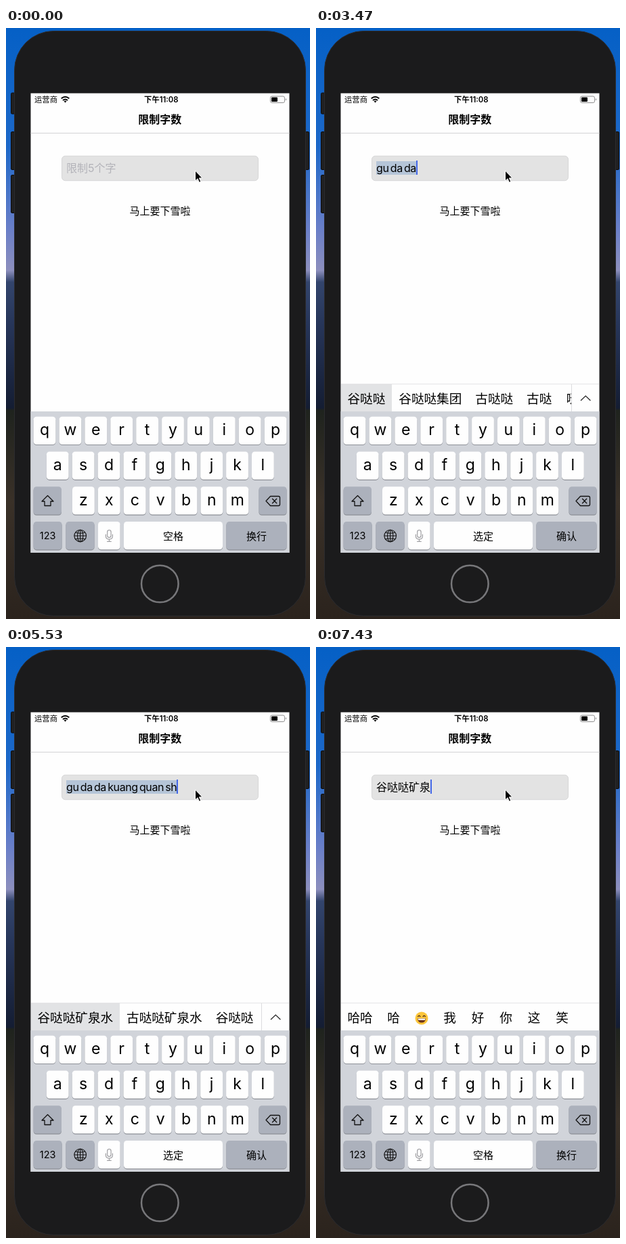
An HTML page for the animation above (8 s loop, 449x874 px).

```html
<!DOCTYPE html>
<html lang="zh-CN">
<head>
<meta charset="utf-8">
<style>
  html, body { margin: 0; width: 100%; height: 100%; overflow: hidden; }
  svg, #field, #bar { position: absolute; }
  #stage { left: 0; top: 0; }
  text { font-family: Inter, 'Noto Sans CJK SC', sans-serif; text-anchor: middle; }
  #field {
    left: 89px; top: 189px; height: 36px; line-height: 36px; white-space: pre;
    font-size: 16px; font-family: Inter, 'Noto Sans CJK SC', sans-serif;
  }
  #typed.marked { background: #b5c5d8; letter-spacing: -.4px; }
  #caret { position: absolute; left: 100%; top: 7px; width: 2px; height: 21px; background: #4468e8; }
  #hint { position: absolute; left: 0; top: 0; color: #b3b3b9; }
  #bar {
    left: 36.5px; top: 526px; width: 381.5px; height: 41px; box-sizing: border-box;
    border-top: 1px solid #e4e4e6;
  }
  #list { display: flex; height: 40px; overflow: hidden; }
  #list span {
    flex: none; box-sizing: border-box; min-width: 41.5px; padding: 0 10px; text-align: center;
    white-space: nowrap; font: 18.6px/39px 'Noto Sans CJK SC', sans-serif;
  }
  #list span.on { background: #e2e3e5; }
  #list svg { position: static; vertical-align: -4px; margin: 0 -1px; }
  #more { left: 340.5px; top: 0; }
</style>
</head>
<body>
<svg id="stage" width="449" height="874">
  <defs>
    <linearGradient id="scene" x2="0" y2="1">
      <stop offset="0" stop-color="#0560c6"/><stop offset=".2" stop-color="#1d68c8"/>
      <stop offset=".34" stop-color="#6a7fc8"/><stop offset=".41" stop-color="#8d8fbd"/>
      <stop offset=".43" stop-color="#33456d"/><stop offset=".5" stop-color="#27365a"/>
      <stop offset=".643" stop-color="#141d33"/><stop offset=".647" stop-color="#1f231e"/>
      <stop offset=".8" stop-color="#3a3128"/><stop offset="1" stop-color="#2b231d"/>
    </linearGradient>
    <symbol id="frog" viewBox="0 0 20 20">
      <g fill="#5aa637"><circle cx="5.4" cy="5.5" r="4"/><circle cx="14.6" cy="5.5" r="4"/>
        <ellipse cx="10" cy="11.5" rx="9.5" ry="7.2"/></g>
      <g fill="#fff"><circle cx="5.2" cy="5.3" r="2.7"/><circle cx="14.8" cy="5.3" r="2.7"/></g>
      <circle cx="5.5" cy="5.3" r="1.8"/><circle cx="14.5" cy="5.3" r="1.8"/>
      <path d="M2 11Q10 15 18 11Q16 17.5 10 17.5T2 11" fill="#d94a3a"/>
    </symbol>
    <symbol id="okay" viewBox="0 0 20 20">
      <g fill="none" stroke="#f6bd35" stroke-linecap="round" stroke-width="2.7">
        <circle cx="6.3" cy="11.2" r="3.2"/><path d="M9 9L8.6 2M12 9L12.4 2.7M14.5 10.5L16.6 5.5"/></g>
      <path d="M9 8.5L15.5 9.5Q16.5 14 13 19H8.5L7 15.5Q10.5 14 9 8.5" fill="#f6bd35"/>
      <path d="M10.8 9.3V5M13.4 10L14 6.5" stroke="#d08a20" stroke-width=".5"/>
    </symbol>
    <symbol id="grin" viewBox="0 0 20 20">
      <circle cx="10" cy="10" r="9.5" fill="#fbc53a"/>
      <path d="M4.3 8Q6.3 4.5 8.2 8M11.8 8Q13.7 4.5 15.7 8" fill="none" stroke="#59351b" stroke-width="1.4"/>
      <path d="M3.8 10.2H16.2Q15.5 16.6 10 16.6T3.8 10.2" fill="#6b3419"/>
      <path d="M4.4 10.6H15.6L15 12.8H5Z" fill="#fff"/>
    </symbol>
  </defs>

  <rect width="449" height="874" fill="url(#scene)"/>
  <g fill="#202021" stroke="#0c0c0e">
    <rect x="7.5" y="96" width="8" height="31" rx="1.5"/>
    <rect x="7.5" y="153.500" width="8" height="56" rx="1.5"/>
    <rect x="7.5" y="217.500" width="8" height="56" rx="1.5"/>
    <rect x="440" y="153.500" width="7.500" height="56" rx="1.5"/>
  </g>
  <rect x="12.500" y="4.500" width="430" height="865" rx="58" fill="#1b1b1c" stroke="#2c2c2f"/>
  <circle cx="227.300" cy="822" r="27.300" fill="none" stroke="#77777a" stroke-width="2.500"/>

  <rect x="36.500" y="96.500" width="382" height="679.500" fill="#fefefe"/>
  <g font-size="11.300" font-weight="500">
    <text x="59" y="110">运营商</text>
    <text x="229.300" y="110" font-weight="600">下午11:08</text>
  </g>
  <g fill="none" stroke="#000" stroke-width="2">
    <path d="M81.700 104.300Q87.500 99.300 93.300 104.300M84 107Q87.500 104 91 107"/>
    <path d="M85.500 108.300Q87.500 106.800 89.500 108.300L87.500 110.600Z" fill="#000" stroke="none"/>
  </g>
  <rect x="390.500" y="101" width="21" height="9.500" rx="2.300" fill="none" stroke="#8d8d8d"/>
  <rect x="392" y="102.500" width="9" height="6.500" rx="1"/>
  <path d="M413 104Q415 105.700 413 107.400Z" fill="#777"/>
  <text x="227.300" y="141" font-size="16" font-weight="600">限制字数</text>
  <path d="M36.500 155.500H418.500" stroke="#d3d3d5"/>
  <rect x="82.500" y="189.300" width="290" height="36.400" rx="5" fill="#e3e3e3" stroke="#d6d6d7"/>
  <text x="227.500" y="275.500" font-size="15">马上要下雪啦</text>
  <path d="M279.500 211V226L283 222.800L285.400 228.300L287.800 227.300L285.400 221.900H290Z" stroke="#fff"/>

  <rect x="36.500" y="567" width="382" height="209" fill="#d1d4da"/>
  <g id="keys"></g>
  <g fill="none" stroke="#111" stroke-width="1.300" stroke-linejoin="round" stroke-linecap="round">
    <path d="M61.500 691.500L70 700H66V706.500H57V700H53Z"/>
    <path d="M390.500 692.500H402.500Q404.500 692.500 404.500 694.500V704.500Q404.500 706.500 402.500 706.500H390.500L384 699.500ZM393.500 696.200L399.700 702.800M399.700 696.200L393.500 702.800"/>
    <g stroke-width="1.100"><circle cx="109.700" cy="751" r="8.800"/><ellipse cx="109.700" cy="751" rx="4.200" ry="8.800"/>
      <path d="M109.700 742.200V759.800M101 751H118.400M102.800 746Q109.700 748.600 116.600 746M102.800 756Q109.700 753.400 116.600 756"/></g>
    <g stroke="#98989c" stroke-width="1.100"><rect x="149.700" y="742.500" width="5.400" height="11" rx="2.700"/>
      <path d="M147.400 749V751.500Q147.400 756 152.400 756T157.400 751.500V749M152.400 756V759.500M149.500 759.500H155.300"/></g>
  </g>
  <text x="61.600" y="756" font-size="14.500">123</text>
  <text id="space" x="247" y="757" font-size="15"></text>
  <text id="enter" x="370" y="757" font-size="15"></text>
</svg>

<div id="field"><span id="typed"></span><span id="hint">限制5个字</span><i id="caret"></i></div>
<div id="bar">
  <div id="list"></div>
  <svg id="more" width="41" height="40" fill="none" stroke="#222">
    <path d="M.5 0V40" stroke="#dcdcde"/><path d="M14 24L21.200 17L28.400 24" stroke-width="1.200"/>
  </svg>
</div>

<script>
const $ = id => document.getElementById(id);
const LOOP = 8000;
const PITCH = 37.9;

function key(x, y, width, fill, label = '') {
  const rect = (dy, color) =>
    `<rect x="${x}" y="${y + dy}" width="${width}" height="41.3" rx="4.5" fill="${color}"/>`;
  return rect(1.1, '#8d9097') + rect(0, fill) +
    `<text x="${x + width / 2}" y="${y + 27.3}" font-size="23">${label}</text>`;
}
const row = (letters, x, y) =>
  [...letters].map((c, i) => key(x + i * PITCH, y, 32.8, '#fefefe', c)).join('');
const GRAY = '#acb1bc';
$('keys').innerHTML =
  row('qwertyuiop', 40.6, 574.7) + row('asdfghjkl', 59.8, 626.5) + row('zxcvbnm', 98, 678.3) +
  key(40.6, 678.3, 41.4, GRAY) + key(373.4, 678.3, 41.2, GRAY) +
  key(40.6, 730, 42, GRAY) + key(88.4, 730, 42.2, GRAY) + key(136, 730, 32.6, '#fefefe') +
  key(174, 730, 146, '#fefefe') + key(325.4, 730, 89.2, GRAY);

const IDLE = ['空格', '换行'], CONFIRM = ['选定', '确认'], SELECT = ['选定', '选定'];
const DONE = '谷哒哒矿泉';
const WATER = '谷哒哒矿泉水 古哒哒矿泉水 谷哒哒 古哒哒';

// [start, text, candidates, key labels]
const states = [
  [0, '', '', IDLE],
  [2340, 'g', '个 给 过 该 跟 更 高 国', CONFIRM],
  [2450, 'gu', '古 谷 骨 股 鼓 故 frog 顾', CONFIRM],
  [2600, 'gu d', '古哒 谷底 古代 孤单 鼓动 古', CONFIRM],
  [2750, 'gu da', '古哒 古大 谷哒 鼓大 古 谷', CONFIRM],
  [2960, 'gu da d', '谷哒哒 古哒哒 古哒 古 谷 骨', CONFIRM],
  [3470, 'gu da da', '谷哒哒 谷哒哒集团 古哒哒 古哒 哒', CONFIRM],
  [3910, 'gu da da k', '古哒哒看 古哒哒哭 谷哒哒 古哒哒', CONFIRM],
  [4000, 'gu da da ku', '古哒哒哭 古哒哒酷 谷哒哒 古哒哒', CONFIRM],
  [4530, 'gu da da ku a', '古哒哒哭啊 古哒哒跨 谷哒哒 古哒哒', CONFIRM],
  [4710, 'gu da da kuan', '古哒哒款 古哒哒宽 谷哒哒 古哒哒', CONFIRM],
  [4790, 'gu da da kuang', '古哒哒狂 古哒哒矿 谷哒哒 古哒哒', CONFIRM],
  [4940, 'gu da da kuang q', '古哒哒矿区 古哒哒狂 谷哒哒 古哒哒', CONFIRM],
  [5120, 'gu da da kuang qu', '古哒哒矿区 古哒哒狂去 谷哒哒', CONFIRM],
  [5210, 'gu da da kuang qu a', '古哒哒狂去啊 古哒哒矿区 谷哒哒', CONFIRM],
  [5360, 'gu da da kuang quan', '谷哒哒矿泉 古哒哒矿泉 谷哒哒 古哒哒', CONFIRM],
  [5450, 'gu da da kuang quan s', WATER, CONFIRM],
  [5740, 'gu da da kuang quan shu', '古哒哒矿泉水 谷哒哒矿泉水 谷哒哒 古哒哒', CONFIRM],
  [5530, 'gu da da kuang quan sh', WATER, CONFIRM],
  [5880, 'gu da da kuang quan shui', WATER, CONFIRM],
  [6170, DONE, '的 是 和 了 有 在 我 不', IDLE],
  [6800, DONE, '和 好 okay 还 会 很 后 话', SELECT],
  [6920, DONE, '哈 蛤 铪 grin 和 好 还 会', CONFIRM],
  [7070, DONE, '哈哈 还好 很好 好好 后悔 好', CONFIRM],
  [7190, DONE, '哈哈 grin 哈 蛤 铪 和 好', CONFIRM],
  [7430, DONE, '哈哈 哈 grin 我 好 你 这 笑', IDLE],
].sort((a, b) => a[0] - b[0]);

// [start, caret opacity]
const blinks = [
  [0, 0], [240, .5], [350, 1], [710, .7], [770, .3], [830, 0],
  [1240, .5], [1300, 1], [1710, .7], [1770, .3], [1830, 0], [2240, .5], [2340, 1],
];

const current = (list, t) => list.findLast(item => item[0] <= t);
const candidate = word => /^[a-z]+$/.test(word)
  ? `<svg width="20" height="20"><use href="#${word}"/></svg>` : word;

let shown;
function show(state) {
  const [start, text, words, labels] = state;
  const typed = $('typed');
  typed.textContent = text.replaceAll(' ', '\u2006');
  typed.className = text && text !== DONE ? 'marked' : '';
  $('hint').style.display = text ? 'none' : '';
  $('bar').style.display = words ? '' : 'none';
  $('list').style.width = start === 7430 ? '381.5px' : '340.5px';
  $('more').style.display = start === 7430 ? 'none' : '';
  $('list').innerHTML = words.split(' ').map((word, i) =>
    `<span class="${i === 0 && labels !== IDLE ? 'on' : ''}">${candidate(word)}</span>`).join('');
  [$('space').textContent, $('enter').textContent] = labels;
  shown = state;
}

const begin = performance.now();
function frame() {
  const t = (performance.now() - begin) % LOOP;
  const state = current(states, t);
  if (state !== shown) show(state);
  $('caret').style.opacity = current(blinks, t)[1];
  requestAnimationFrame(frame);
}
frame();
</script>
</body>
</html>
```
